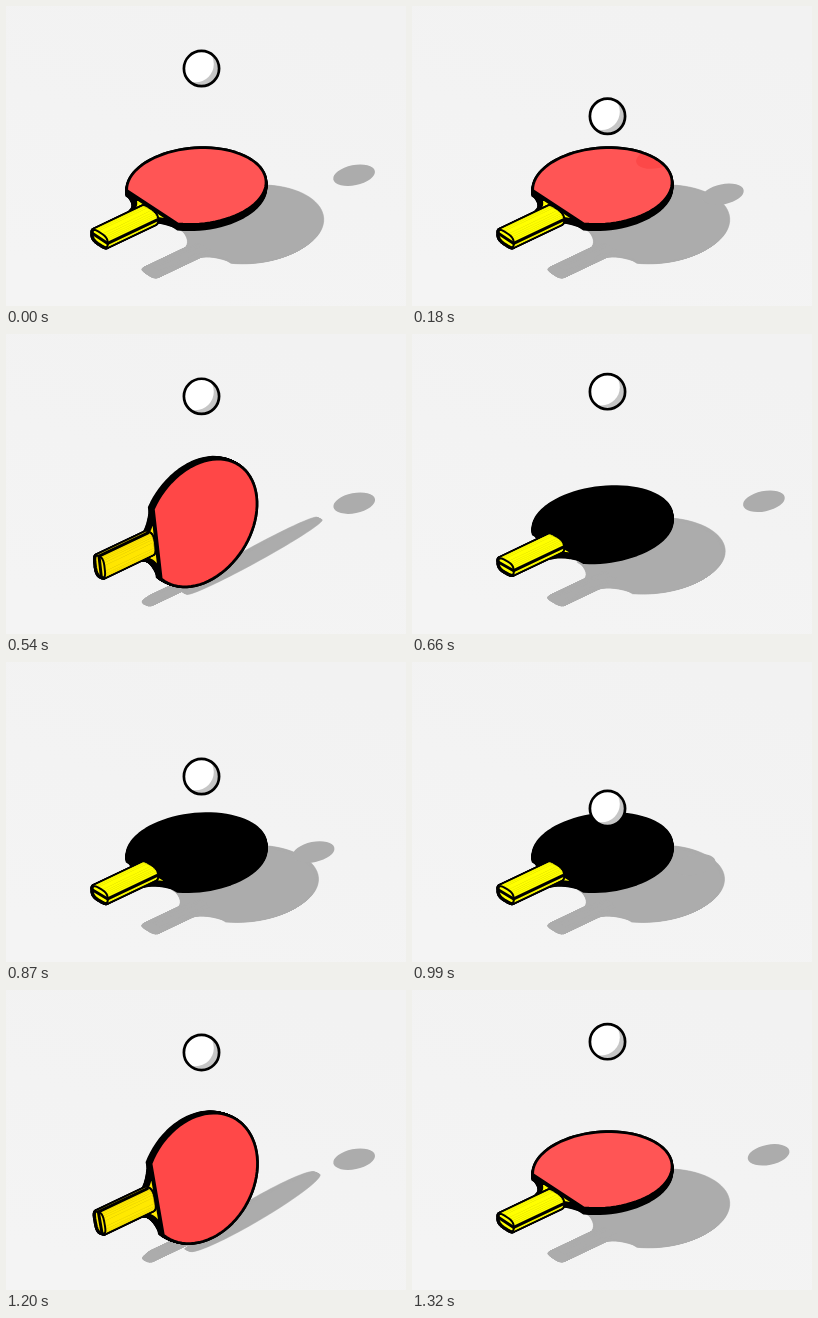
Recreate the animation shown at these times as an HTML page with a canvas. Size 400x300 px, loop 1.35 s.

```html
<!DOCTYPE html>
<html lang="en">
<head>
<meta charset="utf-8">
<title>Bouncing ball</title>
<style>
html, body { margin: 0; width: 100%; height: 100%; overflow: hidden; background: #f3f3f3; }
canvas { display: block; width: 400px; height: 300px; }
</style>
</head>
<body>
<canvas id="stage" width="400" height="300"></canvas>
<script>
const ctx = document.getElementById('stage').getContext('2d');
const LOOP = 1350, STEP = 30;
const SHADE = '#acacac', INK = '#000', LINE = 2.7;

// Screen directions of the handle axis, its horizontal normal, and up.
const AXIS = [0.755, -0.36], SIDE = [0.656, 0.43], UP = [0, -0.84];
const UP_SHADOW = [0.72, -0.35];
const VIEW = { side: 0.635, up: 0.54 };

// Blade: radii, centre along the axis, straight edge, height and half thickness.
const LONG = 73, WIDE = 65, CENTRE = -1.5, CUT = -60, MID = 4.7, HALF = 3.2;
const TAIL = -128.9, NECK = -64, GRIP_W = 11.5, GRIP_H = 7;

const quad = (p, c, q, n = 8) => Array.from({ length: n + 1 }, (_, i) => {
  const t = i / n, s = 1 - t;
  return [0, 1].map(k => s * s * p[k] + 2 * s * t * c[k] + t * t * q[k]);
});
const mirror = pts => pts.map(([a, u]) => [a, -u]).reverse();

const phi = Math.acos((CUT - CENTRE) / LONG);
const rubber = Array.from({ length: 65 }, (_, i) => {
  const w = phi * (i / 32 - 1);
  return [CENTRE + LONG * Math.cos(w), WIDE * Math.sin(w)];
});
const shoulder = quad([CUT, WIDE * Math.sin(phi)], [-66, 15], [-80, 11]);
const wood = [...rubber, ...shoulder, ...mirror(shoulder)];
const flare = quad([-61, 25], [-66, 14], [-76, 10]);
const neck = [...flare, ...mirror(flare)];

// Rounded handle cross-section as [across, height].
const bulge = (v, size) => size * Math.sign(v) * Math.abs(v) ** 0.65;
const grip = Array.from({ length: 24 }, (_, i) => {
  const w = -(i + 0.5) * Math.PI / 12;
  return [bulge(Math.cos(w), GRIP_W), bulge(Math.sin(w), GRIP_H)];
});

function makeFrame(origin, up, c, s) {
  const u = [0, 1].map(k => c * SIDE[k] - s * up[k]);
  const n = [0, 1].map(k => c * up[k] + s * SIDE[k]);
  return (a, b, h) => [0, 1].map(k => origin[k] + a * AXIS[k] + b * u[k] + h * n[k]);
}

function poly(pts, fill, line, width) {
  ctx.beginPath();
  pts.forEach(p => ctx.lineTo(p[0], p[1]));
  ctx.closePath();
  if (fill) { ctx.fillStyle = fill; ctx.fill(); }
  if (width) { ctx.strokeStyle = line; ctx.lineWidth = width; ctx.stroke(); }
}

const flat = (at, pts, h) => pts.map(([a, u]) => at(a, u, h));
const section = at => grip.map(([u, h]) => at(TAIL, u, h));
const gripSides = at => grip.map((p, i) => {
  const q = grip[(i + 1) % grip.length];
  return { p, q, pts: [at(TAIL, ...p), at(NECK, ...p), at(NECK, ...q), at(TAIL, ...q)] };
});

function bladeBody(at, color, width) {
  for (let i = -3; i <= 3; i++) {
    poly(flat(at, rubber, MID + HALF * i / 3), color, color, width);
    poly(flat(at, wood, MID + i / 2), color, color, width);
  }
}

function gripBody(at, color, width) {
  gripSides(at).forEach(f => poly(f.pts, color, color, width));
  poly(section(at), color, color, width);
}

function drawGrip(at, c, s, yellow) {
  gripBody(at, INK, 4.6);
  const seeU = c * VIEW.side - s * VIEW.up, seeN = c * VIEW.up + s * VIEW.side;
  for (const { p, q, pts } of gripSides(at)) {
    const facing = (p[1] - q[1]) * seeU + (q[0] - p[0]) * seeN;
    if (facing > 0) poly(pts, yellow, yellow, 0.6);
  }
  const edge = GRIP_W * Math.sign(seeU);
  poly([at(TAIL, edge, 0), at(NECK, edge, 0)], null, INK, 3);
  poly(section(at), yellow, INK, 2);
  poly([at(TAIL, -GRIP_W, 0), at(TAIL, GRIP_W, 0)], null, INK, 3);
}

function ellipse(x, y, rx, ry, tilt, color) {
  ctx.fillStyle = color;
  ctx.beginPath();
  ctx.ellipse(x, y, rx, ry, tilt, 0, 7);
  ctx.fill();
}

function drawPaddle(angle, ballY) {
  const c = Math.cos(angle), s = Math.sin(angle);
  const at = makeFrame([191.5, 186.1], UP, c, s);
  const redSide = c * VIEW.up + s * VIEW.side > 0;
  const yellow = `rgb(255,${Math.round(226 + 29 * Math.abs(c))},0)`;
  bladeBody(at, INK, LINE);
  poly(flat(at, neck, MID + (redSide ? 1.5 : -1.5)), yellow, INK, 1.6);
  if (redSide) {
    const face = flat(at, rubber, MID + HALF);
    const tone = Math.round(68 + 17 * Math.max(0, c));
    poly(face, `rgb(255,${tone},${tone})`);
    if (angle < 0.01) {
      const k = 164.4 - ballY;
      ctx.save();
      ctx.clip();
      ellipse(195 + 0.92 * k, 179 - 0.5 * k, 21, 10.3, -0.2, '#fc4848');
      ctx.restore();
    }
    poly(face, null, INK, LINE);
  }
  drawGrip(at, c, s, yellow);
}

function drawBall(y) {
  const x = 195.5, r = 17.6;
  ctx.save();
  ctx.beginPath();
  ctx.arc(x, y, r, 0, 7);
  ctx.fillStyle = '#c6c6c6';
  ctx.fill();
  ctx.clip();
  ellipse(x - 6, y - 4.5, 18.3, 18.3, 0, '#fff');
  ctx.restore();
  ctx.beginPath();
  ctx.arc(x, y, r, 0, 7);
  ctx.strokeStyle = INK;
  ctx.lineWidth = LINE;
  ctx.stroke();
}

// Each arc is [time of the top, height of the top]; the ball follows the upper one.
const arcs = [[-51, 60.1], [621, 56.2], [1308, 51.5]];
const ballAt = t => Math.min(...arcs.map(([top, y]) => y + 9.4e-4 * (t - top) ** 2));

function smooth(t, from, to) {
  const x = Math.min(1, Math.max(0, (t - from) / (to - from)));
  return x * x * (3 - 2 * x);
}
const angleAt = t => 177 * Math.PI / 180 * (smooth(t, 421, 673) - smooth(t, 1061, 1315));

const floor = ctx.createLinearGradient(250, 0, 150, 300);
floor.addColorStop(0, '#f2f2f2');
floor.addColorStop(1, '#f4f4f4');

function draw(t) {
  const y = ballAt(t), angle = angleAt(t);
  ctx.fillStyle = floor;
  ctx.fillRect(0, 0, 400, 300);
  ctx.lineJoin = 'round';

  const cast = makeFrame([243.5, 219.5], UP_SHADOW, Math.cos(angle), Math.sin(angle));
  bladeBody(cast, SHADE, 0.6);
  gripBody(cast, SHADE, 1);
  ellipse(348.5 - 0.78 * (y - 62), 169 + 0.4 * (y - 62), 21.2, 10.1, -0.2, SHADE);

  drawPaddle(angle, y);
  drawBall(y);
}

const start = performance.now();
function tick() {
  const t = (performance.now() - start) % LOOP;
  draw(Math.floor(t / STEP) * STEP);
  requestAnimationFrame(tick);
}
tick();
</script>
</body>
</html>
```
